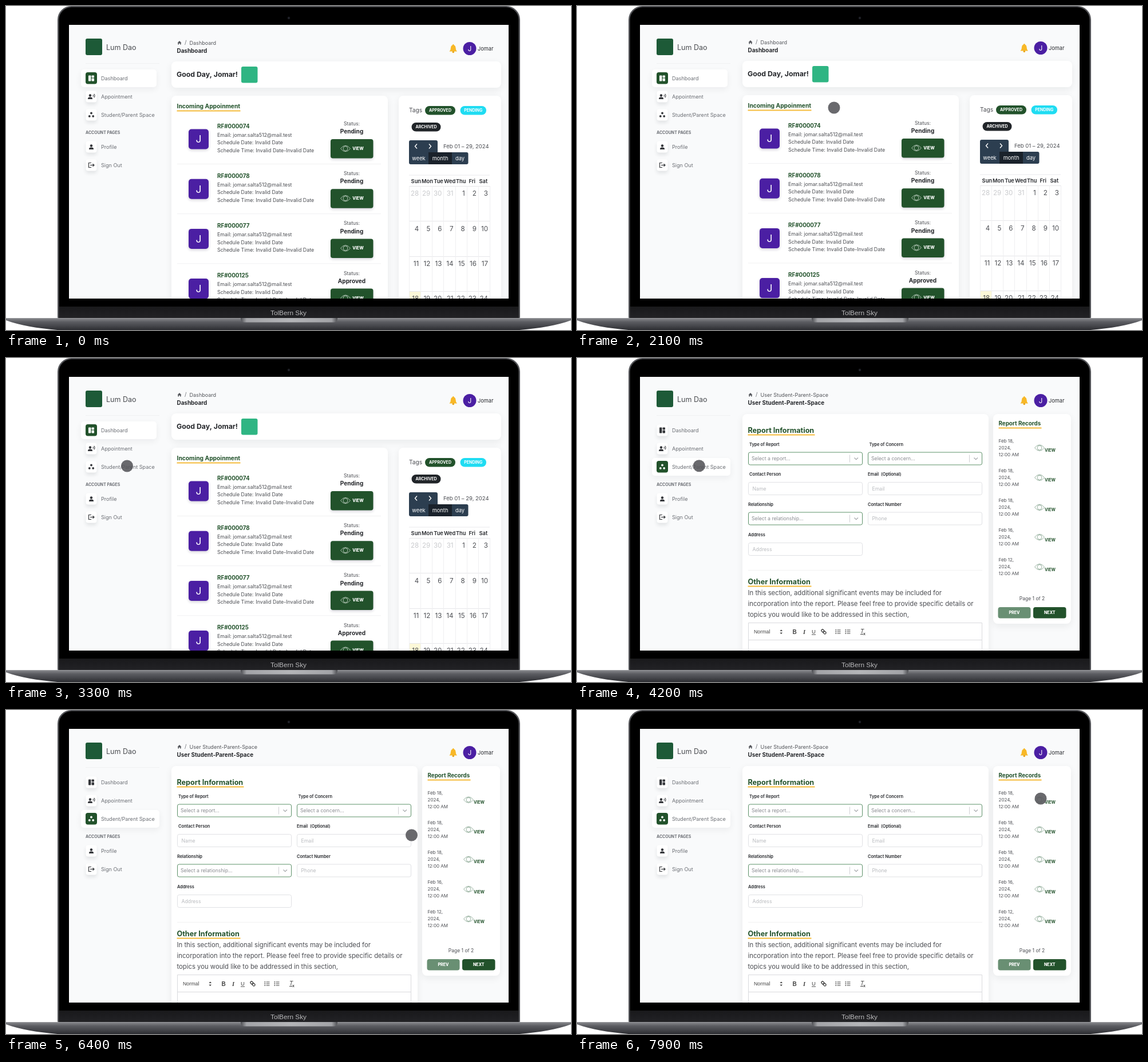
An HTML page with a canvas for the animation above (8000 ms loop, 987 px wide and 567 px high).

```html
<!DOCTYPE html>
<html lang="en">
<head>
<meta charset="utf-8">
<title>Dashboard walkthrough</title>
<style>
html, body { margin: 0; width: 100%; height: 100%; overflow: hidden; background: #fff; }
canvas { display: block; width: 987px; height: 567px; }
</style>
</head>
<body>
<canvas id="stage" width="987" height="567"></canvas>
<script>
const c = document.getElementById('stage').getContext('2d');
const LOOP = 8000, STEP = 100;
const BRAND = 'Lum Dao', USER = 'Jomar', MAIL = 'jomar.salta512@mail.test';
const GREEN = '#22522b', PURPLE = '#4b1fa3', YELLOW = '#f6bb3b', INK = '#26282c',
      TEXT = '#4c4e53', MUTED = '#6c6f75', LINE = '#ececee', SLATE = '#2c3e50';
const SANS = 'Inter, "Open Sans", sans-serif';
const ARIAL = '"Liberation Sans", Arial, sans-serif';

// ---- drawing helpers ----
function text(s, x, y, size, color = TEXT, weight = 400, align = 'left', family = SANS) {
  c.font = `${weight} ${size}px ${family}`;
  c.textAlign = align;
  c.fillStyle = color;
  c.fillText(s, x, y + size * 0.36);
}

function box(x, y, w, h, r, fill, stroke) {
  c.beginPath();
  c.roundRect(x, y, w, h, r);
  if (fill) { c.fillStyle = fill; c.fill(); }
  if (stroke) { c.strokeStyle = stroke; c.lineWidth = 1; c.stroke(); }
}

function card(x, y, w, h, r = 8, blur = 14, alpha = 0.07) {
  c.save();
  c.shadowColor = `rgba(20,25,35,${alpha})`;
  c.shadowBlur = blur;
  c.shadowOffsetY = 4;
  box(x, y, w, h, r, '#fff');
  c.restore();
}

function path(points, color, width = 1, fill) {
  c.beginPath();
  points.forEach(([x, y], i) => i ? c.lineTo(x, y) : c.moveTo(x, y));
  if (fill) { c.fillStyle = color; c.fill(); return; }
  c.strokeStyle = color;
  c.lineWidth = width;
  c.stroke();
}

const hline = (x1, x2, y, color = LINE, w = 1) => path([[x1, y], [x2, y]], color, w);
const vline = (x, y1, y2, color = LINE, w = 1) => path([[x, y1], [x, y2]], color, w);

function dot(x, y, r, color) {
  c.beginPath();
  c.arc(x, y, r, 0, Math.PI * 2);
  c.fillStyle = color;
  c.fill();
}

function eye(x, y, color) {
  c.strokeStyle = color;
  c.lineWidth = 0.9;
  c.beginPath();
  c.moveTo(x - 8.5, y);
  c.quadraticCurveTo(x, y - 10.5, x + 8.5, y);
  c.quadraticCurveTo(x, y + 10.5, x - 8.5, y);
  c.stroke();
  c.beginPath();
  c.arc(x, y, 4, 0, Math.PI * 2);
  c.stroke();
}

function heading(s, x, y, size, w, drop) {
  text(s, x, y, size, GREEN, 700);
  box(x, y + drop - 1, w, 2, 0, YELLOW);
}

function button(s, x, y, w, h, fill, size = 7.1) {
  box(x, y, w, h, 4, fill);
  text(s, x + w / 2, y + h / 2, size, '#fff', 800, 'center');
}

// ---- laptop ----
function gradient(y1, y2, ...stops) {
  const g = c.createLinearGradient(0, y1, 0, y2);
  stops.forEach((s, i) => g.addColorStop(i / (stops.length - 1), s));
  return g;
}

function laptop() {
  c.fillStyle = '#fff';
  c.fillRect(0, 0, 987, 567);
  box(90, 0, 808, 548, [24, 24, 4, 4], '#55565a');
  box(92.5, 2, 803, 546, [22, 22, 2, 2], '#000');
  box(93, 526, 802, 20, 0, gradient(526, 546, '#19191b', '#222225'));
  dot(494, 21, 2.4, '#17181c');
  dot(494, 21, 1, '#2b2d3a');
  text('TolBern Sky', 493.5, 537, 11.8, '#b9b9bb', 400, 'center', ARIAL);

  c.beginPath();
  c.moveTo(0, 546);
  c.lineTo(987, 546);
  c.lineTo(987, 550);
  c.bezierCurveTo(960, 560, 925, 565, 885, 568);
  c.lineTo(102, 568);
  c.bezierCurveTo(62, 565, 27, 560, 0, 550);
  c.closePath();
  c.fillStyle = gradient(546, 567, '#8b8c90', '#5b5c61', '#45464b', '#2c2d31');
  c.fill();
  hline(0, 987, 546.5, '#98999d');
  const g = c.createLinearGradient(410, 0, 579, 0);
  [[0, '#4c4d51'], [0.06, '#a2a3a7'], [0.5, '#b4b5b8'], [0.94, '#a2a3a7'], [1, '#4c4d51']]
    .forEach(s => g.addColorStop(...s));
  box(410, 546, 169, 7.5, [0, 0, 6, 6], g);
}

// ---- sidebar ----
const icons = [
  (x, y, k) => {
    box(x - 5, y - 5, 4.4, 10, 0.8, k);
    box(x + 0.6, y - 5, 4.4, 4, 0.8, k);
    box(x + 0.6, y, 4.4, 5, 0.8, k);
  },
  (x, y, k) => {
    person(x - 2, y, k);
    c.strokeStyle = k;
    c.lineWidth = 1.1;
    for (const r of [2, 4.5]) {
      c.beginPath();
      c.arc(x + 1.5, y - 1.5, r, -0.8, 0.8);
      c.stroke();
    }
  },
  (x, y, k) => {
    dot(x, y - 3, 1.9, k);
    dot(x - 3.2, y + 2.4, 1.9, k);
    dot(x + 3.2, y + 2.4, 1.9, k);
  },
  (x, y, k) => person(x, y, k),
  (x, y, k) => {
    path([[x, y - 4], [x - 4.5, y - 4], [x - 4.5, y + 4], [x, y + 4]], k, 1.2);
    hline(x - 2, x + 5, y, k, 1.2);
    path([[x + 2.5, y - 2.3], [x + 5, y], [x + 2.5, y + 2.3]], k, 1.2);
  }
];

function person(x, y, k) {
  dot(x, y - 2, 2.2, k);
  box(x - 4, y + 1, 8, 3.4, [3, 3, 0, 0], k);
}

const menu = [['Dashboard', 126.5], ['Appointment', 158.5], ['Student/Parent Space', 190.5],
              ['Profile', 246.5], ['Sign Out', 278.5]];

function sidebar(active) {
  box(139, 57, 29, 29, 3, '#1d5a37');
  text(BRAND, 175, 72, 12.5, '#4a4c50');
  hline(139, 268, 100.5, '#f0f1f2');
  menu.forEach(([label, y], i) => {
    const on = i === active;
    if (on) card(131, y - 15.5, i ? 137 : 132, 31, 5, 12, 0.06);
    if (on) box(139, y - 10.5, 20, 20.5, 4, GREEN);
    else card(139.5, y - 10, 19, 20, 4, 6, 0.1);
    icons[i](149, y, on ? '#fff' : '#35373b');
    text(label, 166, y, 9.05, MUTED);
  });
  text('ACCOUNT PAGES', 139, 221.5, 7, MUTED, 700);
}

// ---- top bar ----
function topBar(title, scroll) {
  const lift = Math.min(scroll, 7);
  c.save();
  c.translate(0, -lift);
  if (lift > 4) {
    c.globalAlpha = 0.94;
    card(289, 46, 576, 51, 8, 16, 0.08);
    c.globalAlpha = 1;
  }
  path([[299.5, 64.5], [303, 61], [306.5, 64.5], [305.6, 64.5], [305.6, 67.5], [304, 67.5],
        [304, 65.5], [302, 65.5], [302, 67.5], [300.4, 67.5], [300.4, 64.5]], '#55575c', 1, true);
  text('/', 312, 64, 9.5, MUTED);
  text(title, 320.5, 64.5, 9.05, '#55575c');
  text(title, 298.5, 78.5, 9.9, INK, 700);
  c.fillStyle = '#f8b827';
  c.beginPath();
  c.moveTo(774.5, 79.5);
  c.quadraticCurveTo(777, 77, 777, 73);
  c.bezierCurveTo(777, 66.5, 785.5, 66.5, 785.5, 73);
  c.quadraticCurveTo(785.5, 77, 788, 79.5);
  c.closePath();
  c.fill();
  dot(781.3, 68.2, 1.2, '#f8b827');
  dot(781.3, 80.5, 1.8, '#e9a51c');
  dot(810, 74.5, 11.5, PURPLE);
  text('J', 810, 74.5, 11.5, '#fff', 400, 'center');
  text(USER, 824, 75, 9.2, INK);
  c.restore();
}

// ---- dashboard page ----
const bookings = [['074', 'Pending'], ['078', 'Pending'], ['077', 'Pending'], ['125', 'Approved']];

function booking([id, status], y) {
  c.save();
  c.shadowColor = 'rgba(30,20,60,.2)';
  c.shadowBlur = 5;
  c.shadowOffsetY = 2;
  box(319, y + 5.5, 35, 35, 5, PURPLE);
  box(567, y + 23, 74.5, 33.5, 4, GREEN);
  c.restore();
  text('J', 336.5, y + 23, 17.5, '#fff', 400, 'center');
  text('RF#000' + id, 369, y, 9.8, GREEN, 700);
  text('Email: ' + MAIL, 369, y + 15.5, 8.85);
  text('Schedule Date: Invalid Date', 369, y + 29, 8.85);
  text('Schedule Time: Invalid Date-Invalid Date', 369, y + 42.5, 8.85);
  text('Status:', 604, y - 4, 8.6, TEXT, 400, 'center');
  text(status, 604, y + 9.5, 10.1, INK, 700, 'center');
  eye(593, y + 39.5, '#b9cbbd');
  text('VIEW', 615, y + 39.5, 7.1, '#fff', 800, 'center');
  hline(299, 655, y + 66.5, '#f1f1f2');
}

function pill(s, x, y, w, fill) {
  box(x, y, w, 15.5, 8, fill);
  text(s, x + w / 2, y + 7.8, 7.1, '#fff', 700, 'center');
}

function calendar() {
  const L = 704, R = 845, W = (R - L) / 7, TOP = 315, H = 61.35;
  box(L, 235, 50, 21, [3, 3, 0, 0], SLATE);
  path([[718, 241.5], [714.5, 245.5], [718, 249.5]], '#fff', 1.4);
  path([[739, 241.5], [742.5, 245.5], [739, 249.5]], '#fff', 1.4);
  text('Feb 01 – 29, 2024', 764, 245.5, 9.5);
  box(L, 256, 103.5, 21, [0, 3, 3, 3], SLATE);
  box(738, 256, 41, 21, 0, '#1a222b');
  [['week', 721], ['month', 758.5], ['day', 793]]
    .forEach(([s, x]) => text(s, x, 266.5, 9.3, '#fff', 400, 'center'));

  box(L, TOP + 3 * H, W, H, 0, '#fcf8d8');
  hline(L, R, 296, '#e9e9ec');
  for (let r = 0; r < 7; r++) hline(L, R, Math.round(TOP + r * H) + 0.5, '#e6e6e9');
  for (let k = 0; k < 8; k++) vline(Math.round(L + k * W) + 0.5, TOP, TOP + 6 * H, '#efeff1');
  'Sun Mon Tue Wed Thu Fri Sat'.split(' ')
    .forEach((d, i) => text(d, 716.3 + 19.6 * i, 306.5, 9.3, INK, 600, 'center'));
  for (let i = 0; i < 42; i++) {
    const d = i - 3, inside = d > 0 && d < 30;
    const n = d < 1 ? d + 31 : d > 29 ? d - 29 : d;
    const x = L + W * (i % 7 + 1) - 3, y = TOP + H * Math.floor(i / 7) + 13;
    text(n, x, y, 11.6, inside ? TEXT : '#c9cacd', 400, 'right');
  }
}

function dashboard(scroll) {
  c.save();
  c.translate(0, -scroll);
  card(289, 97, 576, 46);
  text(`Good Day, ${USER}!`, 298, 119.5, 12.3, INK, 700);
  box(411, 106, 28.5, 28.5, 3, '#2fb583');
  card(289, 157, 378, 541);
  heading('Incoming Appoinment', 298.5, 175, 10.25, 111, 8.5);
  bookings.forEach((b, i) => booking(b, 210 + 87.2 * i));
  card(686, 157, 179, 546);
  text('Tags', 704, 182, 10.2);
  pill('APPROVED', 732, 175, 53, GREEN);
  pill('PENDING', 793.5, 175, 45.5, '#1fdcf2');
  pill('ARCHIVED', 708.5, 204, 51, '#212529');
  calendar();
  text(`© 2024, ${BRAND}. All Rights Reserved`, 303.5, 724.5, 8.6, MUTED);
  c.restore();
}

// ---- report page ----
function field(label, hint, x, y, select, indent = 0) {
  text(label, x + indent, y - 13.5, 7.4, INK, 600);
  box(x + 0.5, y + 0.5, 199, 22, 3, '#fff', select ? '#5d9169' : '#e0e1e4');
  text(hint, x + (select ? 6 : 7.5), y + 11.5, 8.7, select ? '#898b90' : '#b9bbbf');
  if (!select) return;
  vline(x + 177.5, y + 5, y + 18, '#cfd0d3');
  path([[x + 185.5, y + 10], [x + 188.7, y + 13.2], [x + 192, y + 10]], '#a6a8ac', 1.2);
}

function toolbar() {
  box(299.5, 463.5, 408, 60, 0, null, '#d9dadd');
  hline(299, 708, 493.5, '#d9dadd');
  const k = '#444', y = 479;
  text('Normal', 309, y, 8.8, k, 500, 'left', ARIAL);
  path([[354.5, 478], [356.7, 475.2], [359, 478]], k, 1, true);
  path([[354.5, 480.4], [356.7, 483.2], [359, 480.4]], k, 1, true);
  text('B', 380, y, 10, k, 700, 'center', ARIAL);
  text('I', 397, y, 10.5, k, 'italic 700', 'center', '"Liberation Serif", serif');
  text('U', 413.5, y - 0.5, 9.5, k, 400, 'center', ARIAL);
  hline(410, 417, 484, k);
  c.save();
  c.translate(431, y);
  c.rotate(Math.PI / 4);
  c.lineWidth = 1.3;
  c.strokeStyle = k;
  for (const x of [-5, -0.6]) {
    c.beginPath();
    c.roundRect(x, -2, 5.4, 4, 2);
    c.stroke();
  }
  c.restore();
  for (const x of [456, 473]) {
    for (let i = -1; i < 2; i++) {
      hline(x - 1.5, x + 4.5, y + 3 * i, k);
      box(x - 4.5, y + 3 * i - 0.8, 1.6, 1.6, 0, k);
    }
  }
  text('T', 498, y - 0.5, 10, k, 'italic 400', 'center', ARIAL);
  hline(495, 500, 483.5, k);
  text('x', 502, 482, 7, k, 700, 'center', ARIAL);
}

function record(date, y) {
  [date + ',', '2024,', '12:00 AM'].forEach((s, i) => text(s, 736.5, y + 12.2 * i, 8));
  eye(808, y + 12.5, '#8ba893');
  text('VIEW', 817, y + 17, 7.1, GREEN, 700);
}

function report() {
  card(289, 98, 430, 440);
  heading('Report Information', 298.5, 126, 12.6, 117, 8.5);
  field('Type of Report', 'Select a report...', 299, 164.5, true, 2);
  field('Type of Concern', 'Select a concern...', 508, 164.5, true, 2.5);
  field('Contact Person', 'Name', 299, 217, false, 2);
  field('Email  (Optional)', 'Email', 508, 217, false);
  field('Relationship', 'Select a relationship...', 299, 269.5, true);
  field('Contact Number', 'Phone', 508, 269.5, false);
  field('Address', 'Address', 299, 323, false);
  hline(299, 708, 371.5, '#f1f1f2');
  heading('Other Information', 298.5, 391, 12.6, 111, 8.5);
  ['In this section, additional significant events may be included for',
   'incorporation into the report. Please feel free to provide specific details or',
   'topics you would like to be addressed in this section,']
    .forEach((s, i) => text(s, 298.5, 410.5 + 19.4 * i, 11.3));
  toolbar();

  card(727, 98, 136, 367);
  heading('Report Records', 736.5, 114, 9.8, 75, 8.5);
  [18, 18, 18, 16, 12].forEach((d, i) => record('Feb ' + d, 144.7 + 52.1 * i));
  text('Page 1 of 2', 795, 420.5, 8.5, TEXT, 400, 'center');
  button('PREV', 735.5, 436, 57, 19.5, '#698f73');
  button('NEXT', 797, 436, 57.5, 19.5, GREEN);
}

// ---- motion ----
const ease = p => p < 0.5 ? 4 * p ** 3 : 1 - (2 - 2 * p) ** 3 / 2;
const span = (t, a, b) => Math.min(1, Math.max(0, (t - a) / (b - a)));

// start, end, target x, target y
const moves = [[1300, 1900, 449, 178], [2800, 3300, 211.5, 189], [4100, 5100, 660.5, 116],
               [5100, 6400, 708.5, 219], [6500, 6800, 716, 208], [7000, 7900, 810, 155]];

function pointer(t) {
  let x = 470, y = 240;
  for (const [a, b, tx, ty] of moves) {
    const p = ease(span(t, a, b));
    x += (tx - x) * p;
    y += (ty - y) * p;
  }
  const press = t === 3800 ? 0.85 : 1;
  c.globalAlpha = 0.88 * span(t, 1300, 1600);
  dot(x, y, 10.5 * press, '#545459');
  c.globalAlpha = 1;
}

function draw(t) {
  const home = t < 3900;
  const scroll = Math.round(234.5 * (ease(span(t, 2050, 2500)) - ease(span(t, 2500, 2900))));
  laptop();
  c.save();
  c.beginPath();
  c.rect(110, 33, 768, 479);
  c.clip();
  c.fillStyle = '#f9fafb';
  c.fillRect(110, 33, 768, 479);
  if (home) dashboard(scroll); else report();
  sidebar(home ? 0 : 2);
  topBar(home ? 'Dashboard' : 'User Student-Parent-Space', scroll);
  pointer(t);
  c.restore();
}

const start = performance.now();
function tick() {
  const t = (performance.now() - start) % LOOP;
  draw(Math.floor(t / STEP) * STEP);
  requestAnimationFrame(tick);
}
tick();
</script>
</body>
</html>
```
